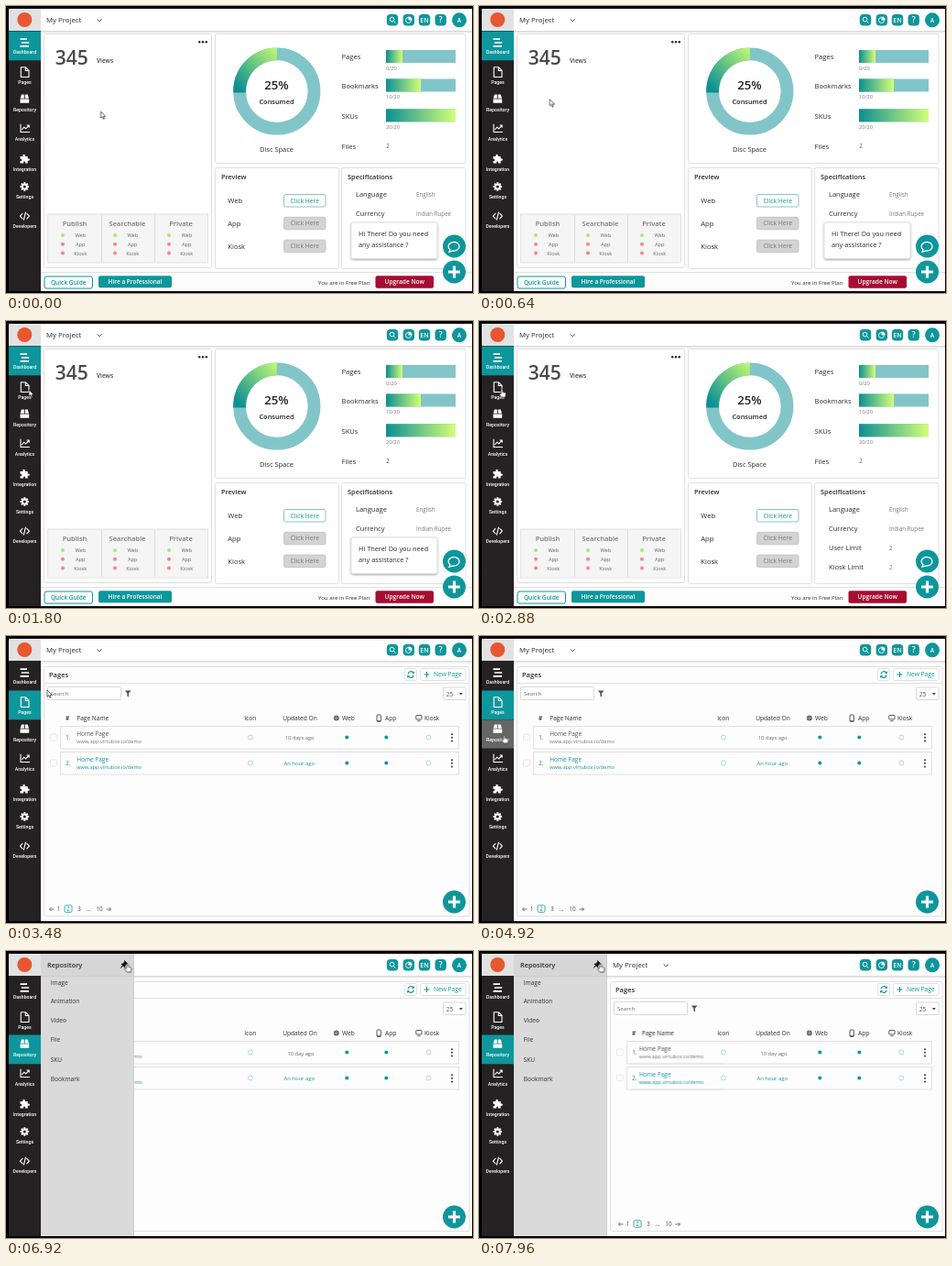
An HTML page for the animation above (8000 ms loop, 510x313 px).

```html
<!DOCTYPE html>
<html lang="en">
<head>
<meta charset="utf-8">
<title>Project dashboard</title>
<style>
html, body { margin: 0; width: 100%; height: 100%; overflow: hidden; background: #000; }
svg { display: block; width: 100vw; height: 100vh; font-family: "Open Sans", "Noto Sans", sans-serif; }
.b { font-weight: 600; }
.m { text-anchor: middle; }
.nav { font-family: Roboto, sans-serif; font-weight: 500; }
.line { fill: none; stroke: #fff; stroke-width: 1.1; stroke-linecap: round; stroke-linejoin: round; }
.anim { animation: 8s linear infinite; }
.step { animation-timing-function: step-end; }

.greeting { animation-name: greeting; }
@keyframes greeting { 0% { opacity: 1 } 25%, 100% { opacity: 0 } }
.pages { animation-name: pages; }
@keyframes pages { 0% { opacity: 0 } 37.5%, 100% { opacity: 1 } }
.active { animation-name: active; }
@keyframes active { 0% { transform: none } 37.5% { transform: translateY(32px) } 86.5%, 100% { transform: translateY(64px) } }
.hover { animation-name: hover; }
@keyframes hover { 0% { opacity: 0 } 55% { opacity: 1 } 86.5%, 100% { opacity: 0 } }
.panel { animation-name: panel; }
@keyframes panel {
  0%, 62.5% { transform: translateX(-104px); animation-timing-function: ease-out }
  66.25%, 100% { transform: none }
}
.slide { --dx: 102px; animation-name: slide; }
@keyframes slide {
  0%, 86.5% { transform: none; animation-timing-function: ease-out }
  90.5%, 100% { transform: translateX(var(--dx)) }
}
.loose { animation-name: loose; }
@keyframes loose { 0% { opacity: 1 } 86.5%, 100% { opacity: 0 } }
.pinned { animation-name: pinned; }
@keyframes pinned { 0% { opacity: 0 } 86.5%, 100% { opacity: 1 } }
.cursor { animation-name: cursor; }
@keyframes cursor {
  0%, 4% { transform: translate(103.5px, 115px); animation-timing-function: ease-in-out }
  14%, 25% { transform: translate(25px, 75px) }
  37% { transform: translate(25px, 73.5px); animation-timing-function: ease-out }
  43.5% { transform: translate(45px, 59px); animation-timing-function: ease-in-out }
  55%, 66.5% { transform: translate(27.5px, 107.5px); animation-timing-function: ease-in-out }
  74% { transform: translate(113px, 12px); animation-timing-function: ease-out }
  79%, 100% { transform: translate(132.5px, 13.5px) }
}
.arrow { animation-name: arrow; }
.hand { animation-name: hand; }
@keyframes arrow { 0% { opacity: 1 } 25% { opacity: 0 } 38% { opacity: 1 } 55% { opacity: 0 } 66.5% { opacity: 1 } 78.5%, 100% { opacity: 0 } }
@keyframes hand { 0% { opacity: 0 } 25% { opacity: 1 } 38% { opacity: 0 } 55% { opacity: 1 } 66.5% { opacity: 0 } 78.5%, 100% { opacity: 1 } }
</style>
</head>
<body>
<svg id="stage" viewBox="0 0 510 313" preserveAspectRatio="none"></svg>
<script>
const TEAL = '#0d969b', PALE = '#82c5c9', INK = '#2c2c2c', GREY = '#777', EDGE = '#e0e0e0', PAPER = '#fefdfe';

const text = (x, y, size, str, fill = INK, cls = '') =>
  `<text x="${x}" y="${y}" font-size="${size}" fill="${fill}" class="${cls}">${str}</text>`;
const box = (x, y, w, h, fill, stroke = 'none', r = 0, extra = '') =>
  `<rect x="${x}" y="${y}" width="${w}" height="${h}" rx="${r}" fill="${fill}" stroke="${stroke}" ${extra}/>`;
const dot = (x, y, r, fill, stroke = 'none', extra = '') =>
  `<circle cx="${x}" cy="${y}" r="${r}" fill="${fill}" stroke="${stroke}" ${extra}/>`;
const path = (d, fill = 'none', stroke = 'none', w = 1, cls = '') =>
  `<path d="${d}" fill="${fill}" stroke="${stroke}" stroke-width="${w}" class="${cls}"/>`;
const stroke = d => `<path d="${d}" class="line"/>`;
const group = (cls, body, style = '') => `<g class="anim ${cls}" style="${style}">${body}</g>`;
const each = (list, fn) => list.map(fn).join('');
const button = (x, y, w, h, str, size, fill, color, edge = 'none', cls = 'm b') =>
  box(x, y, w, h, fill, edge, 2) + text(x + w / 2, y + h / 2 + size * .36, size, str, color, cls);

const defs = `<defs>
  <linearGradient id="bar"><stop stop-color="#0b8f94"/><stop offset="1" stop-color="#d4ff76"/></linearGradient>
  <linearGradient id="arc" x1="0" y1="1" x2="1" y2="0"><stop offset=".1" stop-color="#0b8f94"/><stop offset="1" stop-color="#c4fa72"/></linearGradient>
  <linearGradient id="shade" x2="0" y2="1"><stop stop-color="#000" stop-opacity=".16"/><stop offset="1" stop-color="#000" stop-opacity="0"/></linearGradient>
  <filter id="drop" x="-20%" y="-20%" width="140%" height="150%"><feDropShadow dx="0" dy="1" stdDeviation="1.2" flood-opacity=".35"/></filter>
</defs>`;

const plusButton = dot(489.5, 290, 12.5, TEAL) + path('M489.5 283.5v13M483 290h13', 'none', '#fff', 3.2);

function header() {
  const tools = each([422, 439.8, 457, 474.7], x => box(x - 6.2, 9, 12.4, 12.4, TEAL, 'none', 4));
  return box(38, 3, 471, 24, '#fff') + box(38, 27, 471, 3, 'url(#shade)') + tools +
    dot(421.5, 14.6, 2.3, 'none', '#fff') + path('M423.2 16.4l2.2 2.2', 'none', '#fff') +
    dot(439.5, 15.5, 3, 'none', '#fff', 'stroke-width=".9"') + path('M439.5 15.5v-4a4 4 0 0 1 4 4z', '#fff') +
    text(457, 17.8, 7, 'EN', '#fff', 'm b') + text(474.7, 18.2, 8.5, '?', '#fff', 'm b') +
    dot(495, 15.3, 8, TEAL) + text(495, 17.8, 6.6, 'A', '#fff', 'm b') +
    group('slide', text(44, 18.4, 7.8, 'My Project') + path('M99.8 14.5l2.4 2.4 2.4-2.4', 'none', '#333', .9));
}

function viewsCard() {
  const columns = [['Publish', 75, 62], ['Searchable', 132.5, 119], ['Private', 191, 178]];
  return box(41.5, 30.5, 183, 255, '#fff', EDGE, 2) +
    text(53.8, 63.5, 21, '345', '#4a4a4a', 'b') + text(99, 62, 6.6, 'Views', '#444', 'b') +
    each([211.2, 215, 218.8], x => dot(x, 39.2, 1.2, '#222')) +
    box(45.5, 227, 175, 53, '#f4f5f4', '#e2e2e2') +
    path('M104.5 228v51M162.5 228v51', 'none', '#d6d6d6', .8) +
    each(columns, ([name, x, d]) => text(x, 239.8, 7.5, name, '#777', 'm b') +
      each(['Web', 'App', 'Kiosk'], (kind, i) =>
        dot(d, 250 + i * 9.8, 2, i ? '#f08786' : '#a5e878') +
        text(d + 19.3, 252.2 + i * 9.8, 5.7, kind, '#666', 'm')));
}

function usageCard() {
  const bars = [['Pages', 48, 18, '0/20'], ['Bookmarks', 79.5, 38, '10/20'], ['SKUs', 112.3, 76, '20/20']];
  return box(228.5, 30.5, 273.5, 141, '#fff', EDGE, 2) +
    `<circle cx="295.8" cy="93" r="40.7" fill="none" stroke="${PALE}" stroke-width="13.8"/>` +
    path('M248.2 94.5A47.6 47.6 0 0 1 295.8 45.4V59.2A33.8 33.8 0 0 0 262 94.5z', 'url(#arc)') +
    text(295.5, 91, 13.2, '25%', '#222', 'm b') + text(295.5, 107, 7.4, 'Consumed', '#222', 'm b') +
    text(295.5, 159, 7.5, 'Disc Space', INK, 'm') +
    each(bars, ([name, y, w, count]) => text(366.5, y + 10.3, 7.6, name) +
      box(415, y, 76, 14, PALE) + box(415, y, w, 14, 'url(#bar)') +
      text(415, y + 21.8, 5.6, count, GREY)) +
    text(366.5, 156, 7.6, 'Files') + text(415.3, 155, 6.2, '2', '#555');
}

function detailCards() {
  const specs = [['Language', 'English'], ['Currency', 'Indian Rupee'], ['User Limit', '2'], ['Kiosk Limit', '2']];
  return box(228.5, 176.5, 135, 110, '#fff', EDGE, 2) + text(235, 189, 7.3, 'Preview', INK, 'b') +
    each(['Web', 'App', 'Kiosk'], (name, i) => text(242.3, 215 + i * 24.8, 7.6, name) +
      button(303.5, 205.5 + i * 24.8, 45.5, 13.5, 'Click Here', 6.8,
        i ? '#d3d3d3' : '#fff', i ? '#777' : TEAL, i ? '#c6c6c6' : PALE, 'm')) +
    box(366.5, 176.5, 135.5, 110, '#fff', EDGE, 2) + text(373, 189, 7.4, 'Specifications', INK, 'b') +
    each(specs, ([name, value], i) => text(382, 208 + i * 21, 7.5, name) + text(448, 207.5 + i * 21, 6.2, value, GREY));
}

function dashboard() {
  return box(38, 27, 471, 284, PAPER) + viewsCard() + usageCard() + detailCards() +
    path('M38 290.5H509', 'none', EDGE) +
    button(42, 295, 52.5, 13, 'Quick Guide', 6.6, '#fff', TEAL, TEAL) +
    button(101, 294.3, 80, 13, 'Hire a Professional', 6.5, TEAL, '#fff') +
    text(341, 303.6, 6.15, 'You are in Free Plan') +
    button(403.5, 294.3, 63.5, 13.4, 'Upgrade Now', 6.6, '#a50d31', '#fff') +
    group('greeting step', box(377, 236, 94, 39.5, '#fff', '#ddd', 2, 'filter="url(#drop)"') +
      text(385, 250.8, 7.35, 'Hi There! Do you need') + text(385, 262.6, 7.35, 'any assistance ?')) +
    dot(489.5, 262, 12.5, TEAL) +
    path('M485 265.8a6 4.8 0 1 1 3.2 1.2l-4.2 1.3z', 'none', '#fff', 1.3) + plusButton;
}

function row(y, number, color, age) {
  const sub = color === TEAL ? TEAL : GREY, mid = y + 12;
  return path(`M165 ${y}H494.5V${y + 24.5}H165`, 'none', EDGE) +
    group('slide', path(`M165 ${y}H59.5V${y + 24.5}H165`, 'none', EDGE) +
      box(48.5, y + 8.5, 6.8, 6.8, '#fff', '#e6e6e6', 1) + text(65.2, mid + 2.4, 6.2, number, color)) +
    group('slide', text(77.2, mid - 1.8, 6.5, 'Home Page', color) +
      text(77.2, mid + 6.6, 5.6, 'www.app.virtubox.io/demo', sub), '--dx:97.5px') +
    dot(267, mid, 2.5, '#fff', '#8fd0d2', 'stroke-width=".8"') + age +
    dot(372.3, mid, 2, TEAL) + dot(415.3, mid, 2, TEAL) +
    dot(461.3, mid, 2.5, '#fff', '#8fd0d2', 'stroke-width=".8"') +
    each([-3.6, 0, 3.6], d => dot(487, mid + .3 + d, 1, '#333'));
}

function pages() {
  const pager = each([['1', 57.5], ['2', 68], ['3', 80], ['...', 90.3], ['10', 102]],
    ([s, x]) => text(x, 300.4, 6.2, s, s === '2' ? TEAL : '#444', 'm'));
  const arrows = path('M52.5 298h-5m2-2l-2 2 2 2M109.5 298h5m-2-2l2 2-2 2', 'none', '#555', .8);
  const ages = group('loose step', text(320.7, 112.7, 5.75, '10 days ago', '#666', 'm')) +
    group('pinned step', text(322, 113.9, 5.75, '10 day ago', '#666', 'm'));
  return box(38, 27, 471, 284, PAPER) +
    path('M165 33.5H504Q506 33.5 506 35.5V305.5H165M165 51.5H506', 'none', EDGE) +
    group('slide', path('M165 33.5H43.5Q41.5 33.5 41.5 35.5V303.5Q41.5 305.5 43.5 305.5H165M41.5 51.5H165', 'none', EDGE) +
      text(47, 44.6, 7.5, 'Pages', INK, 'b') + box(45.5, 55.5, 80, 14, '#fff', '#d8d8d8', 1) +
      text(49, 64.7, 6.1, 'Search', '#666') + path('M129.8 59.4h6.8l-2.6 3.2v4l-1.6-1.2v-2.8z', '#555') +
      text(65, 92, 6.6, '#', INK, 'b')) +
    group('slide', text(77.2, 92, 6.6, 'Page Name', INK), '--dx:100.5px') +
    box(435.5, 35.5, 13, 13, '#fff', EDGE, 2) +
    path('M439 41.5a3.2 3.2 0 0 1 5.7-1.6M445 42.6a3.2 3.2 0 0 1-5.7 1.6', 'none', TEAL, 1.2) +
    path('M445.8 38.2v2.8h-2.8zM438.2 45.9v-2.8h2.8z', TEAL) +
    box(452.5, 35.5, 49.5, 13, '#fff', EDGE, 2) + path('M456.5 42h6M459.5 39v6', 'none', TEAL, 1.1) +
    text(467, 44.4, 6.7, 'New Page', TEAL) +
    box(477.5, 56, 24.5, 13.5, '#fff', '#d8d8d8', 1) + text(480.7, 65.5, 6.5, '25', '#555') + path('M494.8 62h4l-2 2.4z', '#444') +
    text(266.7, 92, 6.6, 'Icon', INK, 'm') + text(321, 92, 6.6, 'Updated On', INK, 'm') +
    dot(360.8, 89.5, 3, '#666') + path('M358 89.5h5.6M360.8 86.8v5.4', 'none', '#bbb', .5) + text(367, 92, 6.6, 'Web') +
    box(405, 86, 4.4, 7.4, '#fff', '#444', 1, 'stroke-width=".9"') + path('M405 92.6h4.4', 'none', '#444', .8) + text(414, 92, 6.6, 'App') +
    box(447.8, 86.5, 6.2, 4.4, '#fff', '#444', .6, 'stroke-width=".9"') + path('M449.2 92.7h3.4', 'none', '#444', .8) + text(457, 92, 6.6, 'Kiosk') +
    row(98.5, '1.', '#555', ages) + row(126.5, '2.', TEAL, text(320.3, 140.8, 5.9, 'An hour ago', TEAL, 'm')) +
    group('slide', box(64, 293.7, 8, 7.6, '#fff', TEAL, 1.5, 'stroke-width=".8"') + pager + arrows, '--dx:105px') +
    plusButton;
}

function panel() {
  const items = [['Image', 37.3], ['Animation', 57], ['Video', 77.7], ['File', 98.8], ['SKU', 120.5], ['Bookmark', 141.5]];
  const pin = 'M129.5 10.5l3.2 3.2-1 .4-1.8 1.8-.2 2-1.8-1.8-2.6 2.4 2.3-2.8-1.7-1.6 2-.2 1.6-2.2z';
  return box(38, 3, 102, 308, '#dadada') + box(38, 3, 102, 24, '#d6d6d6') + box(38, 27, 102, 2, 'url(#shade)', 'none', 0, 'opacity=".5"') +
    path('M139.7 3V311', 'none', '#c4c4c4', .6) + text(45, 18.4, 7.4, 'Repository', INK, 'b') +
    each(items, ([name, y]) => text(48.7, y, 6.6, name, '#333')) +
    group('loose step', path(pin, '#ddd', '#444', .7)) + group('pinned step', path(pin, '#111', '#111', .7));
}

function sidebar() {
  const labels = [['Dashboard', 51.8], ['Pages', 85.4], ['Repository', 115.3], ['Analytics', 146.7],
    ['Integration', 179.5], ['Settings', 209.8], ['Developers', 242]];
  const teeth = each([0, 45, 90, 135], a => `<path d="M20.3 192.2v9.6" stroke="#fff" stroke-width="2" transform="rotate(${a} 20.3 197)"/>`);
  return box(3, 3, 35, 308, '#242223') + box(3, 3, 35, 24, '#e2e2e2') + dot(20.3, 15, 8, '#e8572f') +
    group('hover step', box(3, 91.5, 35, 31, '#666')) +
    group('active step', box(3, 27.5, 35, 31.8, TEAL)) +
    path('M15.5 36.2h7.5M16.8 40h8.4M15.5 43.8h9.5', 'none', '#fff', 1.7) +
    stroke('M16.3 66.8h5.2l3.5 3.5v7.2h-8.7zM21.3 67v3.5h3.5') +
    path('M15.6 100.8l1.3-4.3h2.9v4.3zM20.8 96.5h2.9l1.3 4.3h-4.2zM15.5 101.6h9.7v4.2h-9.7z', '#fff') +
    stroke('M16 129v8.5h9.5M17.6 134.5l2.2-2.4 1.8 1.8 3.4-3.6M23 130h2.2v2.2') +
    path('M15.5 164h3c-1-3 3-3 2.2 0h3v2.6c3-1 3 3 0 2.1v2.8h-2.6c.6-2.6-2.6-2.6-2 0h-3.6v-2.4c2.4.4 2.4-2.8 0-2.3z', '#fff') +
    teeth + dot(20.3, 197, 3.5, '#fff') + dot(20.3, 197, 1.6, '#242223') +
    stroke('M18 226.3l-2.6 2.8 2.6 2.8M22.8 226.3l2.6 2.8-2.6 2.8M21.4 225l-2 8.2') +
    each(labels, ([name, y]) => text(20.5, y, 5.2, name, '#fff', 'nav m'));
}

const cursor = group('cursor',
  group('arrow step', path('M0 0V7.2L1.7 5.7 2.9 8.4 4.1 7.9 2.9 5.3H5.2z', '#fff', '#222', .7)) +
  group('hand step', path('M-.9 .8Q0-.4.9.8V3.8L3.6 4.5Q4.6 4.8 4.4 6L3.8 9.6H-.4L-2.9 6.2Q-3 5-1.9 5.2L-.9 6z', '#fff', '#222', .7)));

const frame = path('M0 0H510V313H0zM3 3V311H509V3z', '#000');

document.getElementById('stage').innerHTML = defs + dashboard() +
  group('pages step', pages()) + header() + group('panel', panel()) + sidebar() + cursor + frame;
</script>
</body>
</html>
```
